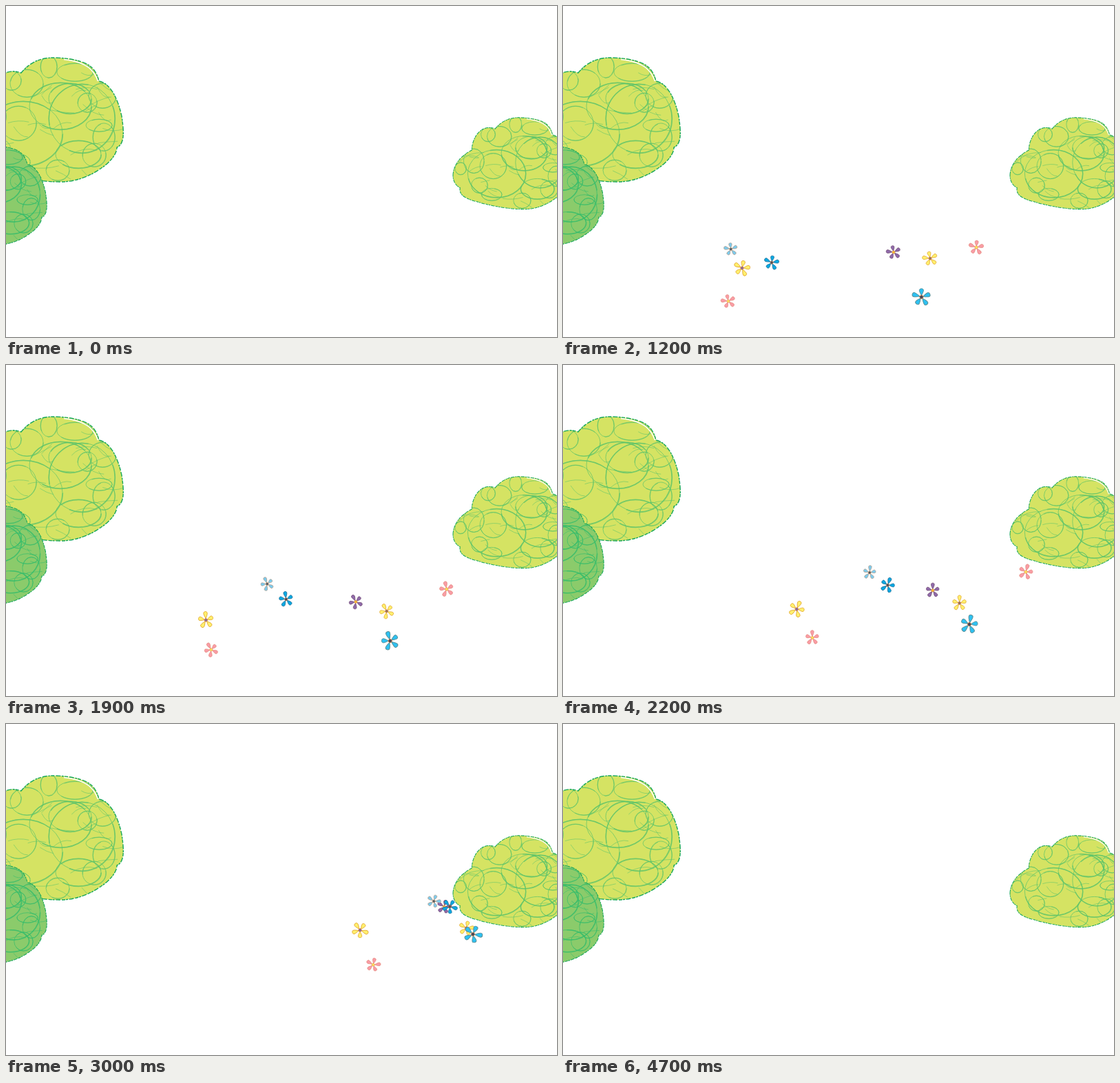
An HTML page for the animation above (4800 ms loop, 800x480 px).

```html
<!DOCTYPE html>
<html lang="en">
<head>
<meta charset="utf-8">
<title>Flowers on the wind</title>
<style>
  html, body { margin: 0; width: 100%; height: 100%; overflow: hidden; background: #fff; }
  svg { display: block; width: 800px; height: 480px; }
  .light { --leaf: #d5e363; --curl: #5cc46a; --gap: #fff; }
  .dark { --leaf: #8bcb6b; --curl: #35bd6c; --gap: none; }
  .leaf { fill: var(--leaf); }
  .curls { fill: none; stroke: var(--curl); stroke-opacity: .7; }
  .curls *, .edge { vector-effect: non-scaling-stroke; }
  .edge { fill: none; stroke: #16a75a; stroke-width: 1.4; stroke-dasharray: 7 1.5 3 1 5 2; }
  .gap { fill: none; stroke: var(--gap); stroke-width: 1.6; }
</style>
</head>
<body>
<svg viewBox="0 0 800 480">
  <defs>
    <path id="shape" d="M-61 188C-60 166-44 149-24 139C-24 118-8 86 22 97C34 82 50 75 68 75C90 75 108 79 119 85C129 91 133 101 135 109C152 112 163 136 168 160C171 180 173 200 161 205C161 215 151 227 137 236C120 248 100 255 78 255C50 255 15 249-15 240C-38 234-50 226-47 213C-56 208-61 200-61 188Z"/>
    <clipPath id="inside"><use href="#shape"/></clipPath>
    <g id="bush">
      <use href="#shape" class="leaf"/>
      <g id="curls" class="curls" clip-path="url(#inside)"></g>
      <path class="gap" d="M84 77.500C106 80 116 86 121 90C128 96 131 102 133.500 109"/>
      <use href="#shape" class="edge"/>
    </g>
    <path id="petal" d="M1.500 0C4-.800 6-2.300 8-2.300C10.600-2.300 10.600 2 8.300 2.200C6 2.300 4 .800 1.500 0Z"/>
  </defs>
  <use href="#bush" class="light"/>
  <use href="#bush" class="dark" transform="translate(-77 142.500) scale(.8)"/>
  <g id="flowers"></g>
  <use href="#bush" class="light" transform="translate(694 106.500) scale(.738)"/>
</svg>
<script>
const LOOP = 4800, STEP = 100;
const $ = id => document.getElementById(id);

function add(parent, tag, attrs) {
  const el = document.createElementNS('http://www.w3.org/2000/svg', tag);
  for (const key in attrs) el.setAttribute(key, attrs[key]);
  return parent.appendChild(el);
}

let seed = 11;
function random(lo, hi) {
  seed = (seed * 16807) % 2147483647;
  return lo + (hi - lo) * seed / 2147483647;
}

// Leaf scribbles: x, y, rx, ry
const loops = [
  [79, 145, 45, 34], [93, 134, 31, 22], [25, 185, 57, 47], [18, 170, 26, 25],
  [110, 163, 48, 50], [135, 173, 19, 9], [118, 140, 14, 14], [128, 216, 17, 17],
  [105, 215, 33, 20], [75, 238, 17, 15], [62, 88, 12, 16], [100, 96, 26, 13],
  [8, 108, 14, 14], [-9, 208, 16, 15], [-46, 175, 11, 12], [15, 226, 20, 12],
  [-20, 160, 20, 24], [140, 130, 20, 18], [142, 190, 16, 20], [30, 112, 24, 20]
];
for (const [x, y, rx, ry] of loops) {
  add($('curls'), 'ellipse', { cx: x, cy: y, rx, ry, 'stroke-width': 1 });
  // a heavier stretch of the same stroke
  add($('curls'), 'ellipse', {
    cx: x + .4, cy: y + .4, rx, ry, 'stroke-width': rx > 30 ? 1.5 : 1,
    'stroke-dasharray': `${rx * 2} ${rx}`
  });
}
for (let i = 0; i < 34; i++) {
  const x = random(-50, 150), y = random(95, 245), dx = random(14, 40), dy = random(-16, 16);
  add($('curls'), 'path', {
    d: `M${x} ${y}q${dx / 2} ${dy + random(-9, 9)} ${dx} ${dy}`, 'stroke-width': .8
  });
}

// x, y: [start, speed per s, midpoint of the speed-up in s]; ramp: its length in s
const flowers = [
  { x: [480, 125, 1.75], y: [357, -79, 1.835], ramp: 1.1, r: 10.5, turn: 17, born: .3, ink: ['#8f6bab', '#70486f', '#f8b830'] },
  { x: [533, 122, 1.89], y: [366, -66, 1.94], ramp: 1.25, r: 11, turn: 17, born: .62, ink: ['#fff06e', '#e2a52e', '#98705c'] },
  { x: [599, 110, 1.536], y: [350, -92, 1.657], ramp: .95, r: 11, turn: 32, born: .1, ink: ['#f99ca6', '#e58b7c', '#ffe35c'] },
  { x: [240, 214, 1.63], y: [428, -58, 1.64], ramp: .58, r: 10.5, turn: 16, born: .1, ink: ['#f99ca6', '#e58b7c', '#ffe35c'] },
  { x: [260, 219, 1.84], y: [380, -69, 1.826], ramp: .85, r: 12, turn: 40, born: .35, ink: ['#fff06e', '#e2a52e', '#8d6a94'] },
  { x: [234, 220, 1.24], y: [356, -55, 1.2], ramp: .5, r: 10, turn: 22, born: .25, ink: ['#7ccbee', '#b39a84', '#45596f'] },
  { x: [303, 216, 1.42], y: [372, -68, 1.425], ramp: .45, r: 11, turn: 36, born: .3, ink: ['#0ba8e2', '#276f94', '#4c4a5c'] },
  { x: [520, 110, 1.564], y: [422, -89, 1.684], ramp: .9, r: 13.5, turn: 28, born: .2, ink: ['#2dc1f2', '#5a8f96', '#45465c'] }
];
const lengths = [1, .92, 1.03, .9, .97];

for (const f of flowers) {
  const [petal, line, heart] = f.ink;
  f.el = add($('flowers'), 'g', {});
  lengths.forEach((len, i) => add(f.el, 'use', {
    href: '#petal', fill: petal, stroke: line, 'stroke-width': .7,
    transform: `rotate(${i * 72}) scale(${len} 1)`
  }));
  add(f.el, 'circle', { r: 1.9, fill: heart, stroke: '#df9148', 'stroke-width': .5 });
}

// Steady speed after a linear ramp centred on mid
function glide([start, speed, mid], ramp, t) {
  const since = t - mid + ramp / 2;
  if (since <= 0) return start;
  return start + speed * (since < ramp ? since * since / (2 * ramp) : since - ramp / 2);
}

// Degrees turned, slowly gaining speed
function spin(t) {
  const s = t - .8;
  return 60 * s + 13 * s * s;
}

function draw() {
  const t = Math.floor(performance.now() % LOOP / STEP) * STEP / 1000;
  for (const f of flowers) {
    const x = glide(f.x, f.ramp, t), y = glide(f.y, f.ramp, t);
    const grow = Math.min(1, Math.max(0, (t - f.born) / .38));
    const shown = grow > 0 && y > 220; // higher up they are behind the bush
    f.el.setAttribute('visibility', shown ? 'visible' : 'hidden');
    f.el.setAttribute('transform',
      `translate(${x} ${y}) rotate(${f.turn + spin(t)}) scale(${grow * f.r / 10})`);
  }
  requestAnimationFrame(draw);
}
draw();
</script>
</body>
</html>
```
